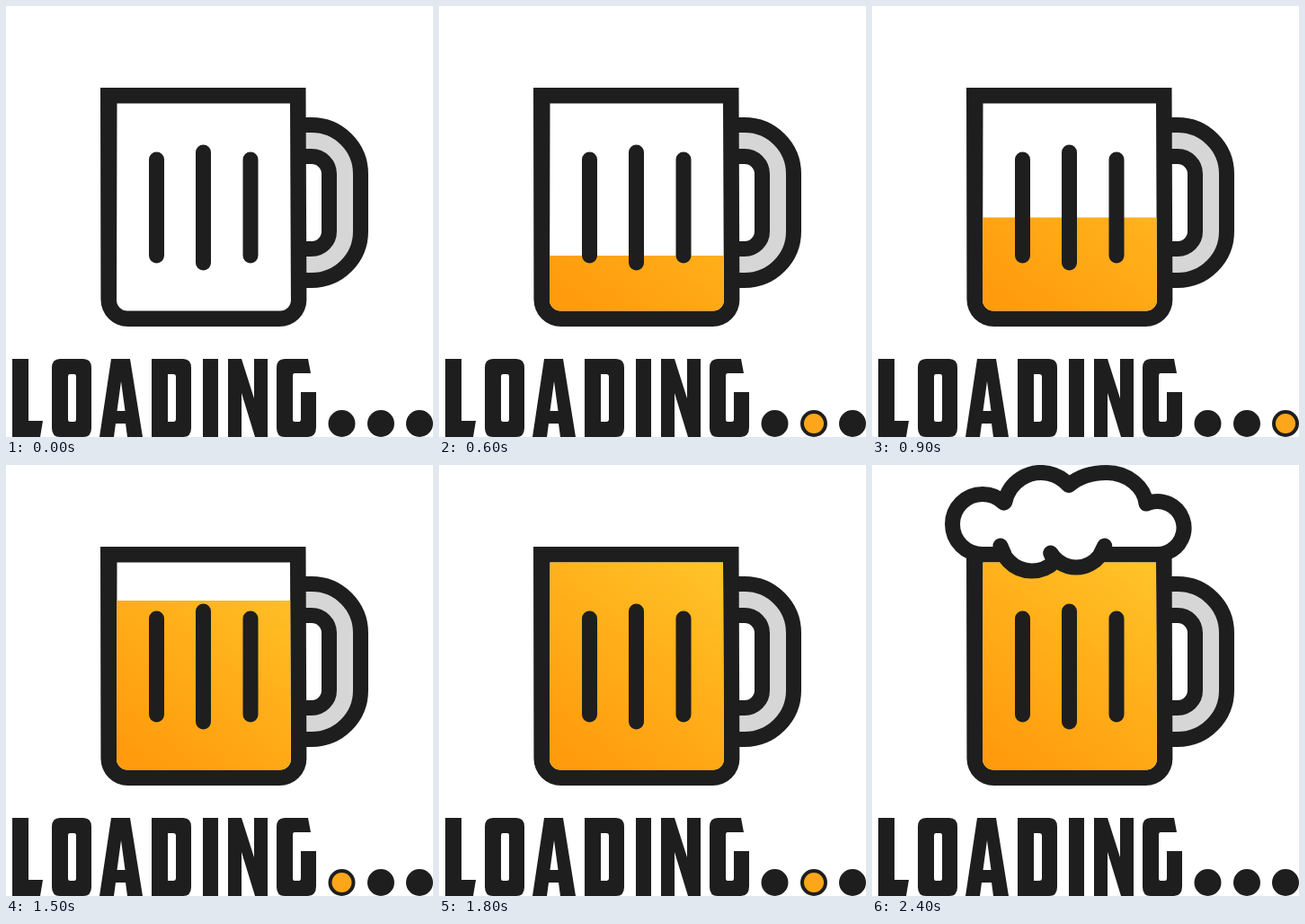
Animation of 475 by 480 pixels, one loop 2.7 s. Source, as an HTML page with a canvas:

```html
<!DOCTYPE html>
<html lang="en">
<head>
<meta charset="utf-8">
<title>Loading</title>
<style>
html, body { margin: 0; width: 100%; height: 100%; overflow: hidden; background: #fff; }
canvas { display: block; }
</style>
</head>
<body>
<canvas id="stage" width="475" height="480" role="img" aria-label="LOADING..."></canvas>
<script>
const ctx = document.getElementById('stage').getContext('2d');
const DARK = '#1e1e1e', GREY = '#d6d6d6', AMBER = '#fda61a', WHITE = '#fff';
const LINE = 17, STEP = 300, STEPS = 9;
const LEVELS = [340, 314, 278, 235.5, 193, 151, 108];
const DOTS = [373.5, 417, 460];
const rad = deg => deg * Math.PI / 180;

const beer = ctx.createLinearGradient(310, 110, 145, 330);
beer.addColorStop(0, '#ffc328');
beer.addColorStop(0.5, '#ffae19');
beer.addColorStop(1, '#ff9b0c');

function fill(path, color, rule = 'nonzero') {
  ctx.fillStyle = color;
  ctx.fill(path, rule);
}

function stroke(path, color, width = LINE) {
  ctx.strokeStyle = color;
  ctx.lineWidth = width;
  ctx.stroke(path);
}

// Cup with square top corners and rounded bottom corners
function cup(x1, y1, x2, y2, r, lean) {
  const p = new Path2D();
  p.moveTo(x1, y1);
  p.lineTo(x2, y1);
  p.arcTo(x2 + 1, y2, x1, y2, r);
  p.arcTo(x1 + lean, y2, x1, y1, r);
  p.closePath();
  return p;
}

function handleBand(r) {
  const p = new Path2D();
  p.moveTo(330, 187 - r);
  p.arc(340, 187, r, rad(-90), 0);
  p.arc(340, 251, r, 0, rad(90));
  p.lineTo(330, 251 + r);
  return p;
}

function foamShape() {
  const p = new Path2D();
  p.arc(123, 66, 33.5, rad(90), rad(-45));
  p.arc(188, 49.5, 41, rad(-168), rad(-41));
  p.bezierCurveTo(230, 13, 245, 8.5, 261, 8.5);
  p.bezierCurveTo(285, 8.5, 303, 25, 305, 43);
  p.arc(317.5, 70, 29.5, rad(-110), rad(90));
  p.lineTo(254, 99.5);
  p.arc(227, 81, 33, rad(16), rad(149));
  p.arc(178, 82, 36, rad(46), rad(167));
  p.lineTo(147, 99.5);
  p.closePath();
  return p;
}

const outer = cup(105, 91, 333.5, 357, 30, 0.5);
const inner = cup(123.5, 108.5, 316, 339.5, 12, -0.5);
const foam = foamShape();

const letters = new Path2D([
  'M7 393H25V462H41L38 480H7Z',
  'M60 393H86Q95 393 95 403V470Q95 480 86 480H60Q51 480 51 470V403Q51 393 60 393Z',
  'M71 410Q69 410 69 413V460Q69 463 71 463H76Q78 463 78 460V413Q78 410 76 410Z',
  'M117 393H138L152 480H135L133 465H122L120 480H104Z M128 418L123.5 451H132.5Z',
  'M162 393H197Q206 393 206 403V470Q206 480 197 480H162Z',
  'M180 410V463H186Q189 463 189 460V413Q189 410 186 410Z',
  'M219 393H236V480H219Z',
  'M247 393H262L276 437V393H291V480H277L262 431V480H247Z',
  'M310 393H336L339 409H321Q319 409 319 412V460Q319 463 321 463H326Q328 463 328 460V430H345V469Q345 480 336 480H310Q301 480 301 470V403Q301 393 310 393Z'
].join(''));

function drawHandle() {
  stroke(handleBand(37), GREY, 22);
  stroke(handleBand(54.5), DARK);
  stroke(handleBand(19.5), DARK);
}

function drawMug(level) {
  fill(outer, DARK);
  fill(inner, WHITE);
  ctx.save();
  ctx.clip(inner);
  ctx.fillStyle = beer;
  if (level < 340) ctx.fillRect(120, level, 200, 341 - level);
  ctx.restore();

  const bars = new Path2D();
  for (const [x, top, end] of [[167.5, 171, 278], [219.5, 163, 286], [272, 171, 278]]) {
    bars.moveTo(x, top);
    bars.lineTo(x, end);
  }
  ctx.lineCap = 'round';
  stroke(bars, DARK);
  ctx.lineCap = 'butt';
}

function drawFoam(dripping) {
  ctx.save();
  ctx.beginPath();
  ctx.rect(0, 0, 475, dripping ? 480 : 111);
  ctx.clip();
  ctx.lineJoin = 'round';
  fill(foam, WHITE);
  stroke(foam, DARK);
  ctx.restore();
}

function disc(x, r, color) {
  const p = new Path2D();
  p.arc(x, 465, r, 0, rad(360));
  fill(p, color);
}

function draw(step) {
  ctx.fillStyle = WHITE;
  ctx.fillRect(0, 0, 475, 480);
  drawHandle();
  drawMug(LEVELS[Math.min(step, 6)]);
  if (step >= 7) drawFoam(step === 8);
  fill(letters, DARK, 'evenodd');
  DOTS.forEach((x, i) => {
    disc(x, 15, DARK);
    if (step % 4 === i + 1) disc(x, 11, AMBER);
  });
}

function tick() {
  draw(Math.floor(performance.now() / STEP) % STEPS);
  requestAnimationFrame(tick);
}
tick();
</script>
</body>
</html>
```
